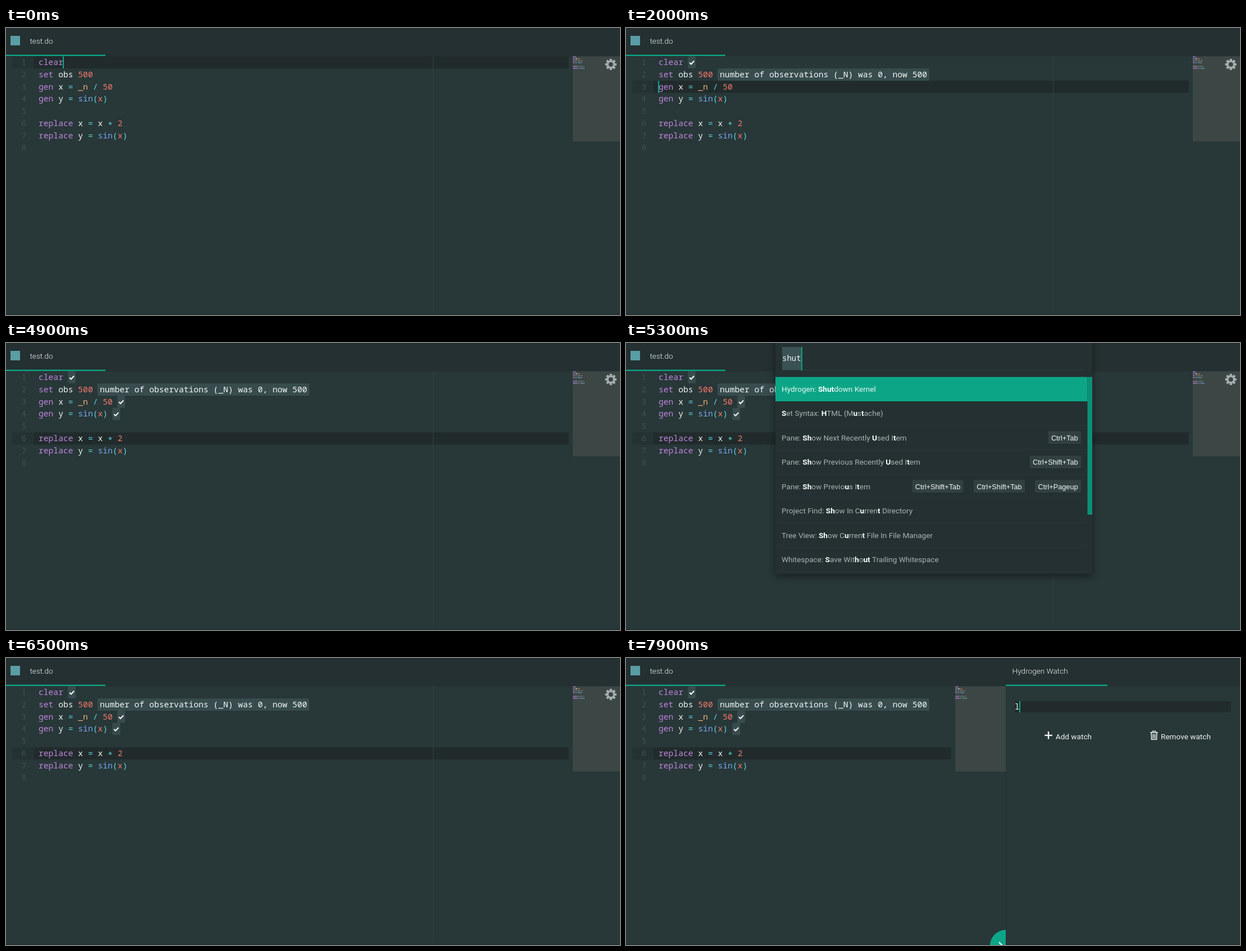
Recreate the animation shown at these times as an HTML page with a canvas. Size 1093 px wide and 512 px high, loop 8000 ms.

```html
<!DOCTYPE html>
<html lang="en">
<head>
<meta charset="utf-8">
<title>Editor session</title>
<style>
html, body { margin: 0; width: 100%; height: 100%; overflow: hidden; background: #283738; }
canvas { display: block; width: 1093px; height: 512px; }
</style>
</head>
<body>
<canvas id="stage" width="1093" height="512"></canvas>
<script>
const ctx = document.getElementById('stage').getContext('2d');
const W = 1093, H = 512, LOOP = 8000;
const CODE = '14.65px "Noto Sans Mono", "DejaVu Sans Mono", monospace';
const INPUT = '14px "Noto Sans Mono", "DejaVu Sans Mono", monospace';
const UI = '13.6px Roboto, sans-serif';
const UI_LIGHT = '300 ' + UI, UI_BOLD = 'bold ' + UI;
const KEYS = '12.7px "Liberation Sans", Arial, sans-serif';
const CHAR = 8.79, LINE = 21.78, LEFT = 58, TOP = 50.5, BASELINE = 66;
const C = {
  bg: '#283738', bar: '#243031', row: '#212b2c', gutterRow: '#253233', teal: '#0ca687', bubble: '#384c4e',
  k: '#bf86dc', t: '#eef5f4', o: '#5bd5da', n: '#f2796c', f: '#76a8f0', y: '#efb377'
};

// Each token is a colour key, a colon and its text.
const lines = [
  ['k:clear'],
  ['k:set', 't: obs', 'n: 500'],
  ['k:gen', 't: x', 'o: =', 'y: _n', 'o: /', 'n: 50'],
  ['k:gen', 't: y', 'o: =', 'f: sin', 'o:(', 'n:x', 'o:)'],
  [],
  ['k:replace', 't: x', 'o: =', 't: x', 'o: *', 'n: 2'],
  ['k:replace', 't: y', 'o: =', 'f: sin', 'o:(', 'n:x', 'o:)'],
  []
].map(line => {
  let col = 0;
  return line.map(token => {
    const text = token.slice(2), start = col;
    col += text.length;
    return { color: C[token[0]], text, start };
  });
});
const lineLength = i => lines[i].reduce((n, token) => n + token.text.length, 0);

// Asterisks toggle the bold matches; the rest of each entry lists key bindings.
const shutList = [
  ['Hydrogen: *Shut*down Kernel'],
  ['*S*et Syntax: *H*TML (M*u*s*t*ache)'],
  ['Pane: *Sh*ow Next Recently *U*sed I*t*em', 'Ctrl+Tab'],
  ['Pane: *Sh*ow Previous Recently *U*sed I*t*em', 'Ctrl+Shift+Tab'],
  ['Pane: *Sh*ow Previo*u*s I*t*em', 'Ctrl+Shift+Tab', 'Ctrl+Shift+Tab', 'Ctrl+Pageup'],
  ['Project Find: *Sh*ow In C*u*rren*t* Directory'],
  ['Tree View: *Sh*ow C*u*rren*t* File In File Manager'],
  ['Whitespace: *S*ave Wit*h*o*ut* Trailing Whitespace']
];
const windowList = [
  ['Close', 'Ctrl+Shift+W'], ['Reload', 'Ctrl+Shift+F5'], ['Save All'], ['Run Benchmarks'],
  ['Reset Font Size', 'Ctrl+0'], ['Toggle Menu Bar'], ['Focus Next Pane', 'Ctrl+K Ctrl+N'],
  ['Toggle Dev Tools', 'Ctrl+Shift+I']
].map(([name, ...keys]) => ['*W*indow: ' + name, ...keys]);
const watchList = [
  ['Hydrogen: Toggle *Wat*ches'],
  ['Hydrogen: Add *Wat*ch'],
  ['Hydrogen: Remove *Wat*ch'],
  ['*W*indow: Toggle *A*u*t*o Hide Menu Bar'],
  ['*W*hitesp*a*ce: Save Wi*t*h Trailing Whitespace'],
  ['*W*hitesp*a*ce: Remove *T*railing Whitespace'],
  ['*W*hitesp*a*ce: Convert *T*abs To Spaces'],
  ['*W*hitesp*a*ce: Convert Spaces To *T*abs']
];

// Time, line (1-based) and visibility of the editor caret.
const caretSteps = [
  [0, 1, 1], [400, 2, 1], [800, 2, 0], [1200, 2, 1], [1500, 2, 0], [2000, 3, 1], [2300, 3, 0],
  [2500, 4, 1], [2700, 4, 0], [3000, 6, 1], [3300, 6, 0], [3600, 6, 1], [4100, 6, 0],
  [4500, 6, 1], [4900, 6, 0]
];

const clamp = v => Math.max(0, Math.min(1, v));

function rect(x, y, w, h, color) {
  ctx.fillStyle = color;
  ctx.fillRect(x, y, w, h);
}

function rounded(x, y, w, h, r, color) {
  ctx.fillStyle = color;
  ctx.beginPath();
  ctx.roundRect(x, y, w, h, r);
  ctx.fill();
}

function text(str, x, y, font, color, align = 'left') {
  ctx.font = font;
  ctx.fillStyle = color;
  ctx.textAlign = align;
  ctx.fillText(str, x, y);
  return ctx.measureText(str).width;
}

function path(points, color, width) {
  ctx.strokeStyle = color;
  ctx.lineWidth = width;
  ctx.beginPath();
  points.forEach(([x, y]) => ctx.lineTo(x, y));
  ctx.stroke();
}

function clipped(x, y, w, h, paint) {
  ctx.save();
  ctx.beginPath();
  ctx.rect(x, y, w, h);
  ctx.clip();
  paint();
  ctx.restore();
}

function bubble(line, width) {
  const x = LEFT + (lineLength(line) + 1) * CHAR - .6, y = TOP + line * LINE;
  rounded(x, y, width, 21.6, 2, C.bubble);
  return [x, y];
}

function checkBubble(line) {
  const [x, y] = bubble(line, 14);
  path([[x + 3, y + 11.2], [x + 5.8, y + 14], [x + 11, y + 8.3]], '#fff', 2.1);
}

function spinnerBubble(line) {
  const [x, y] = bubble(line, 66);
  for (let i = 0; i < 5; i++) rect(x + 14 + i * 9, y + 7 + i % 2, 5, 8 - i % 2 * 2, '#b5c3c3');
}

function gear(x, y) {
  ctx.fillStyle = '#a3afae';
  ctx.beginPath();
  for (let i = 0; i < 8; i++) {
    const a = i * Math.PI / 4;
    [[-.32, 7.4], [-.2, 10.3], [.2, 10.3], [.32, 7.4]].forEach(([d, r]) =>
      ctx.lineTo(x + r * Math.cos(a + d), y + r * Math.sin(a + d)));
  }
  ctx.closePath();
  ctx.moveTo(x + 4, y);
  ctx.arc(x, y, 4, 0, Math.PI * 2, true);
  ctx.fill('evenodd');
}

function minimap(x, t) {
  rect(x, TOP, 90, 152, '#3b4645');
  ctx.globalAlpha = .6;
  lines.forEach((line, i) => line.forEach(({ color, text: str, start }) => {
    const word = str.trimStart();
    rect(x + (start + str.length - word.length) * 1.17, 50.5 + i * 3.4, word.length * 1.17 - .2, 2, color);
  }));
  ctx.globalAlpha = 1;
  if (t < 7100) gear(x + 67.7, 65);
}

function editor(t, dockX, sliding) {
  const mapX = Math.min(1009, dockX - 90);
  const [, caretLine, caretOn] = caretSteps.filter(s => s[0] <= t).pop();
  const caretY = TOP + (caretLine - 1) * LINE;

  rect(0, 0, W, TOP, C.bar);
  rect(0, 0, W, 1, '#202a2b');
  rect(0, 47.6, 177, 2.4, C.teal);
  rect(8, 14, 17, 17, '#5a9da4');
  text('test.do', 42.5, 27.6, UI_LIGHT, '#f0f5f5');

  rect(11, caretY, 38, LINE, C.gutterRow);
  rect(49, caretY, mapX - (sliding ? 0 : 7) - 49, LINE, C.row);
  rect(760, TOP, 1, 460, '#304041');

  lines.forEach((line, i) => {
    const y = BASELINE + i * LINE;
    text(String(i + 1), 36.2, y, CODE, '#3f5052', 'right');
    line.forEach(({ color, text: str, start }) => {
      const drop = str.includes('*') ? 2.6 : 0; // centre the operator on the line
      text(str, LEFT + start * CHAR, y + drop, CODE, color);
    });
  });

  if (t >= 500) checkBubble(0);
  else if (t >= 400) spinnerBubble(0);
  if (t >= 2000) {
    const [x] = bubble(1, 377);
    text('number of observations (_N) was 0, now 500', x + 4.2, BASELINE + LINE, CODE, '#f3f7f7');
  }
  if (t >= 2500) checkBubble(2);
  if (t >= 3000) checkBubble(3);

  if (caretOn) rect(caretLine === 1 ? 101 : 57, caretY, 2, LINE, C.teal);
  minimap(mapX, t);
}

function keyBox(label, right, y, selected) {
  ctx.font = KEYS;
  const w = ctx.measureText(label).width + 11;
  rounded(right - w, y - 12, w, 24, 2, selected ? '#1fac90' : '#1e2829');
  rounded(right - w, y - 12, w, 23, 2, selected ? '#169f84' : '#324041');
  text(label, right - w + 5.5, y + 4.6, KEYS, '#f4f7f7');
  return right - w - 18;
}

function paletteRow([label, ...keys], i) {
  const pitch = 43.45, top = 60.6 + i * pitch, y = top + pitch / 2;
  const selected = i === 0;
  if (selected) rect(266, top, 555.5, pitch, C.teal);
  else rect(266, top + pitch - 1, 555.5, 1, '#2b393a');
  let x = 277;
  label.split('*').forEach((part, j) => {
    const bold = j % 2;
    x += text(part, x, y + 4.7, bold ? UI_BOLD : UI, bold ? '#fff' : selected ? '#e4f5f1' : '#a8b4b4');
  });
  keys.reduceRight((right, key) => keyBox(key, right, y, selected), 810);
}

function palette(t) {
  const typing = t >= 6000;
  const query = t >= 6200 ? 'wat' : typing ? 'w' : 'shut';
  const list = t >= 6200 ? watchList : typing ? windowList : shutList;
  const thumb = t >= 6200 ? 150 : typing ? 20.5 : 245.5;

  ctx.save();
  ctx.shadowColor = 'rgba(0,0,0,.45)';
  ctx.shadowBlur = 12;
  ctx.shadowOffsetY = 4;
  rect(266, -10, 564, 422, C.bar);
  ctx.restore();

  const end = 278 + query.length * 8.45;
  if (!typing) rect(278, 7, end - 278, 42, '#3b5254');
  rect(278, 48, 540.5, 1, '#2d3c3e');
  ctx.globalAlpha = clamp((t - 5300) / 300);
  rect(278, 46.7, 540.5, 2.3, C.teal);
  ctx.globalAlpha = 1;
  text(query, 278, 31.7, INPUT, '#eef4f4');
  rect(end, 7, 2, 42, C.teal);

  clipped(266, 60, 564, 352, () => list.forEach(paletteRow));
  rect(821.5, 60.6, 8.5, thumb, '#0c9075');
}

function trash(x, y) {
  const ink = '#eff4f4';
  rect(x - 6.5, y - 6, 13, 1.6, ink);
  path([[x - 2.5, y - 6], [x - 2.5, y - 7.7], [x + 2.5, y - 7.7], [x + 2.5, y - 6]], ink, 1.3);
  path([[x - 5, y - 5], [x - 4.5, y + 7.3], [x + 4.5, y + 7.3], [x + 5, y - 5]], ink, 1.5);
  for (const dx of [-2.2, 0, 2.2]) rect(x + dx - .6, y - 2.5, 1.2, 8, ink);
}

function dock(t, x, remaining) {
  const left = x - Math.round(Math.min(16, remaining * 21.7));
  clipped(x, 0, W - x, H, () => {
    rect(x, 0, W - x, H, C.bg);
    rect(x, 0, W - x, TOP, C.bar);
    rect(x, 0, W - x, 1, '#202a2b');
    rect(x, TOP, 1, H - TOP, '#243132');
    rect(left, 47.6, 181, 2.4, C.teal);
    text('Hydrogen Watch', left + 11.6, 27.6, UI_LIGHT, '#f0f5f5');

    rect(left + 16, 77, 385, 20, C.row);
    const typed = t >= 7900;
    if (typed) text('l', left + 16, 91.5, INPUT, '#eef4f4');
    if (t < 7600 || typed) rect(left + (typed ? 24 : 16), 77, 2, 20, C.teal);

    rect(left + 69.3, 136.8, 13.5, 2.4, '#eff4f4');
    rect(left + 74.8, 131.2, 2.4, 13.5, '#eff4f4');
    text('Add watch', left + 88.8, 144.7, UI, '#eff4f4');
    trash(left + 264, 138);
    text('Remove watch', left + 276, 144.7, UI, '#eff4f4');
  });
}

function dockToggle(x, scale) {
  clipped(0, 0, x, H, () => {
    ctx.translate(x, 513);
    ctx.scale(scale, scale);
    ctx.fillStyle = C.teal;
    ctx.beginPath();
    ctx.arc(0, 0, 28, 0, Math.PI * 2);
    ctx.fill();
    path([[-12, -6], [-6.5, -.5], [-12, 5]], '#fff', 2);
  });
}

function draw(t) {
  const docked = t >= 6900;
  const remaining = (1 - clamp((t - 6880.8) / 200)) ** 3;
  const dockX = docked ? Math.round(676 + 417 * remaining) : 1099;

  rect(0, 0, W, H, C.bg);
  editor(t, dockX, docked && remaining > 0);
  if (docked) dock(t, dockX, remaining);
  rect(0, 510, W, 2, '#223031');
  if (t > 7100) dockToggle(dockX, clamp((t - 7100) / 300));
  if (t >= 5300 && t < 6500) palette(t);
}

const startTime = performance.now();
function tick() {
  const t = (performance.now() - startTime) % LOOP;
  draw(Math.floor(t / 100) * 100);
  requestAnimationFrame(tick);
}
tick();
</script>
</body>
</html>
```
